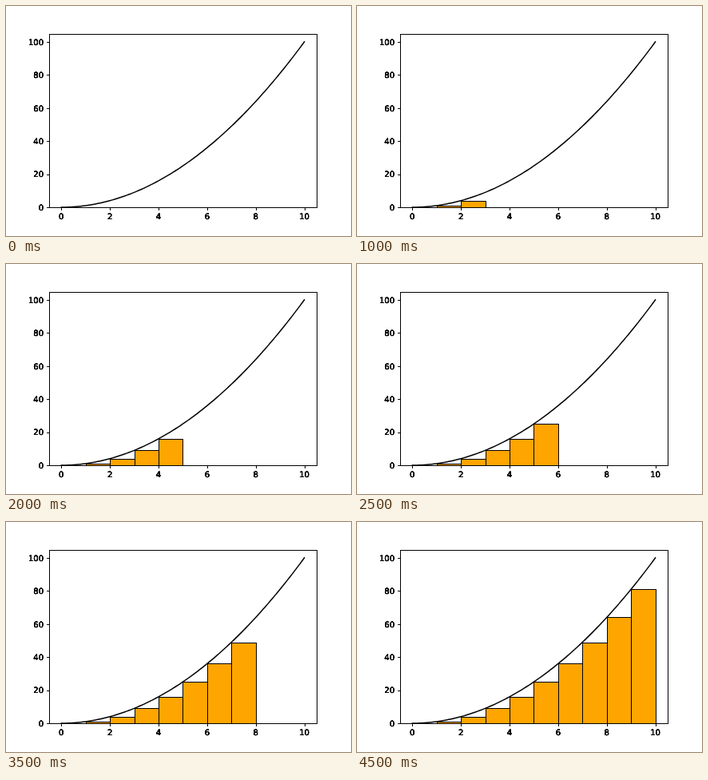
These frames come from a looping animation (432 px wide and 288 px high, 5000 ms). An HTML page:

```html
<!DOCTYPE html>
<html lang="en">
<head>
<meta charset="utf-8">
<title>Left Riemann sum of x²</title>
<style>
  html, body { margin: 0; width: 100%; height: 100%; overflow: hidden; background: #fff; }
  svg { display: block; width: 432px; height: 288px; }
  text { font: 10px "DejaVu Sans", sans-serif; text-rendering: geometricPrecision; }
</style>
</head>
<body>
<svg id="plot" viewBox="0 0 432 288">
  <rect width="432" height="288" fill="#fff"/>
  <g id="bars" fill="#ffa500" stroke="#000"></g>
  <path id="curve" fill="none" stroke="#000" stroke-width="1.5" stroke-linecap="square" stroke-linejoin="round"/>
  <g id="axes" fill="none" stroke="#000"></g>
  <g id="labels"></g>
</svg>
<script>
const STEP = 500, LOOP = 5000;
const LABEL_PASSES = 6; // overlaid labels give hard, heavy glyph edges
const box = { left: 54, right: 388.8, top: 34.56, bottom: 252 };

const xPos = x => box.left + (x + 0.5) * (box.right - box.left) / 11;
const yPos = y => box.bottom - y * (box.bottom - box.top) / 105;
const snap = v => Math.floor(v + 0.5) + 0.5;
const byId = id => document.getElementById(id);

function add(parent, tag, attrs, text) {
  const el = document.createElementNS("http://www.w3.org/2000/svg", tag);
  for (const key in attrs) el.setAttribute(key, attrs[key]);
  if (text !== undefined) el.textContent = text;
  byId(parent).appendChild(el);
  return el;
}

function rect(parent, left, top, right, bottom) {
  const x = snap(left), y = snap(top);
  return add(parent, "rect", { x, y, width: snap(right) - x, height: snap(bottom) - y });
}

function label(x, y, anchor, value) {
  for (let i = 0; i < LABEL_PASSES; i++) {
    add("labels", "text", { x, y, "text-anchor": anchor }, value);
  }
}

const bars = [];
for (let x = 0; x < 10; x++) {
  bars.push(rect("bars", xPos(x), yPos(x * x), xPos(x + 1), yPos(0)));
}

const points = Array.from({ length: 101 }, (_, i) => {
  const x = i / 10;
  return xPos(x).toFixed(2) + " " + yPos(x * x).toFixed(2);
});
byId("curve").setAttribute("d", "M" + points.join("L"));

rect("axes", box.left, box.top, box.right, box.bottom);
for (let i = 0; i <= 5; i++) {
  const x = xPos(2 * i), y = yPos(20 * i);
  add("axes", "path", { d: `M${snap(x)} 252v4M55 ${snap(y)}h-4` });
  label(x, 267, "middle", 2 * i);
  label(47, Math.round(y + 3.8), "end", 20 * i);
}

function draw(now) {
  const last = Math.floor((now % LOOP) / STEP);
  bars.forEach((bar, i) => bar.setAttribute("visibility", i <= last ? "visible" : "hidden"));
}

let start;
function tick(now) {
  if (start === undefined) start = now;
  draw(now - start);
  requestAnimationFrame(tick);
}
draw(0);
requestAnimationFrame(tick);
</script>
</body>
</html>
```
